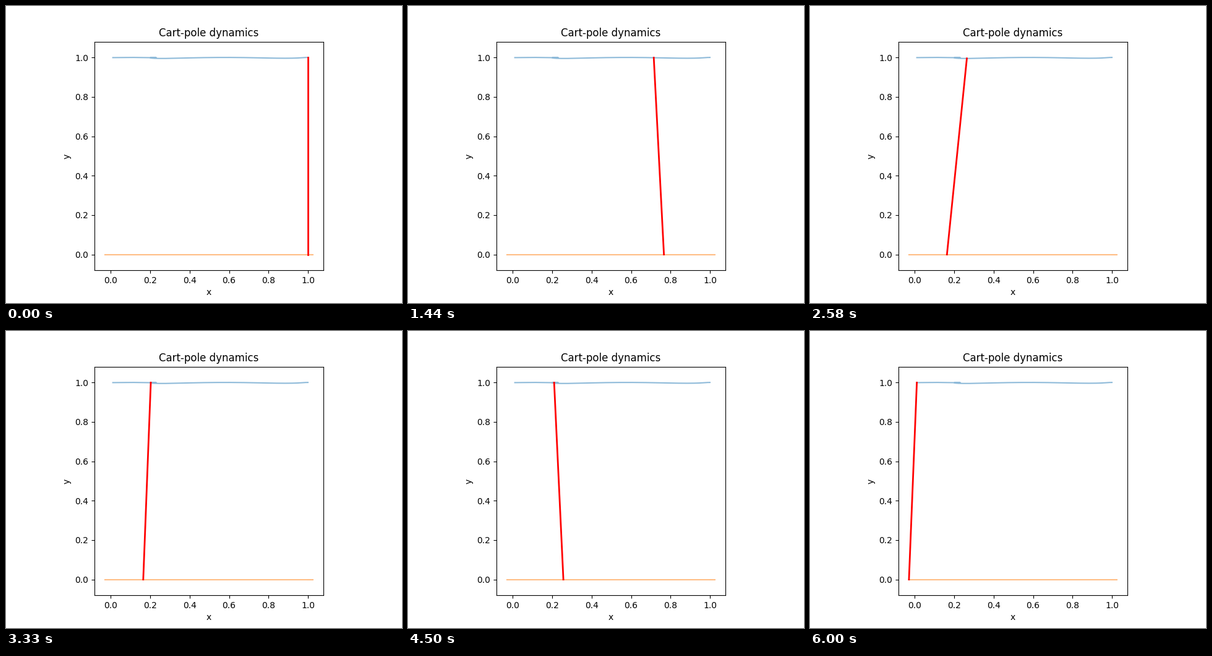
Write a matplotlib script that moves like this. It is 640x480 px and loops after 6.03 s.

```python
import numpy as np
import matplotlib.pyplot as plt
from matplotlib.animation import FuncAnimation

FRAMES = 201
STEP_MS = 30
GRAVITY = 9.81
DT = 0.02      # simulated seconds per frame
KEY_GAP = 20   # frames between cart keys

CART_KEYS = np.array([1, 1.025, 0.89, 0.542, 0.217, 0.1255,
                      0.2145, 0.2815, 0.199, 0.054, -0.03])
TIP_END = 0.01


def solve_band(diag, rhs, first, last):
    """Solve v[i-1] + diag * v[i] + v[i+1] = rhs[i] with fixed ends."""
    n = len(rhs)
    a = diag * np.eye(n) + np.eye(n, k=1) + np.eye(n, k=-1)
    a[0], a[-1] = np.eye(n)[0], np.eye(n)[-1]
    b = rhs.copy()
    b[0], b[-1] = first, last
    return np.linalg.solve(a, b)


def smooth_path(keys, gap):
    """Cubic spline through evenly spaced keys, at rest at both ends."""
    slope = solve_band(4, 3 * np.gradient(keys) * 2, 0, 0)
    u = np.arange((len(keys) - 1) * gap + 1) / gap
    j = np.minimum(u.astype(int), len(keys) - 2)
    s = u - j
    return ((1 + 2 * s) * (1 - s) ** 2 * keys[j]
            + s * (1 - s) ** 2 * slope[j]
            + s * s * (3 - 2 * s) * keys[j + 1]
            + s * s * (s - 1) * slope[j + 1])


def balanced_tip(cart, end):
    """Tip of a unit pole: its acceleration is gravity times the lean."""
    k = GRAVITY * DT ** 2
    return solve_band(-2 - k, -k * cart, cart[0], end)


cart_x = smooth_path(CART_KEYS, KEY_GAP)
cart_y = np.zeros(FRAMES)
tip_x = balanced_tip(cart_x, TIP_END)
tip_y = np.sqrt(1 - (tip_x - cart_x) ** 2)

fig, ax = plt.subplots(figsize=(6.4, 4.8), dpi=100)
ax.set_aspect("equal")
ax.set_xlim(-0.0825, 1.078)
ax.set_ylim(-0.0803, 1.0802)
ax.set_title("Cart-pole dynamics")
ax.set_xlabel("x")
ax.set_ylabel("y")

ax.plot(tip_x, tip_y, color="C0", alpha=0.5)
ax.plot(cart_x, cart_y, color="C1", alpha=0.5)
pole, = ax.plot([], [], color="red", lw=2)


def update(i):
    pole.set_data([cart_x[i], tip_x[i]], [cart_y[i], tip_y[i]])
    return pole,


anim = FuncAnimation(fig, update, frames=FRAMES, interval=STEP_MS, repeat=True)
plt.show()
```
